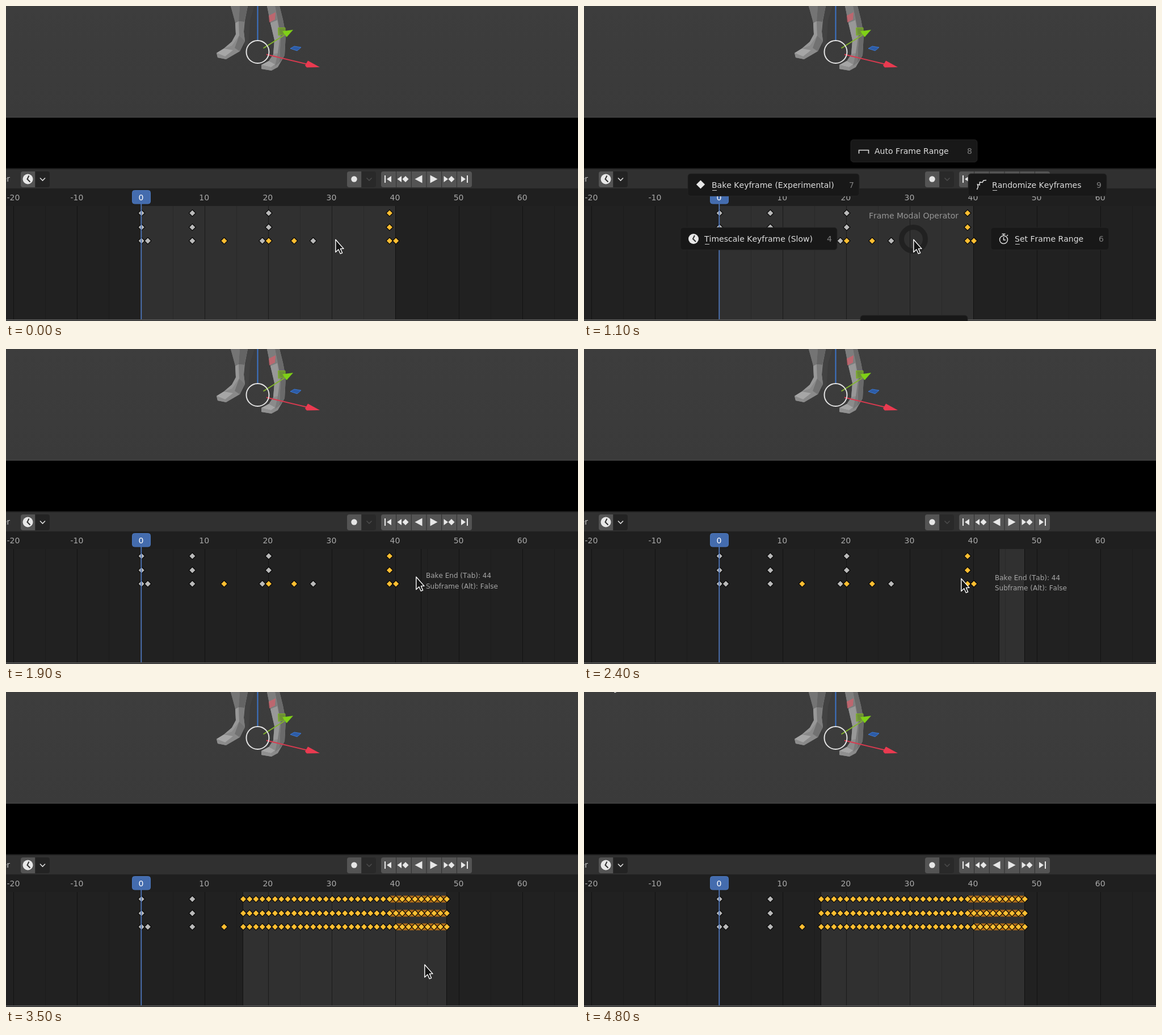
Write an HTML page that moves like this. It is 1008 px wide and 556 px high and loops after 5000 ms.

```html
<!DOCTYPE html>
<html lang="en">
<head>
<meta charset="utf-8">
<title>Keyframe baking</title>
<style>
html, body { margin: 0; width: 100%; height: 100%; overflow: hidden; background: #000; }
svg { display: block; width: 1008px; height: 556px; }
text { font: 14px "DejaVu Sans", sans-serif; font-kerning: none; white-space: pre; }
.hint text { font-size: 12px; fill: #a6a6a6; }
</style>
</head>
<body>
<svg id="stage" viewBox="0 0 1008 556" xmlns="http://www.w3.org/2000/svg">
  <defs>
    <linearGradient id="floor" x1="0" y1="0" x2="0" y2="1">
      <stop offset="0" stop-color="#3d3d3d"/><stop offset="1" stop-color="#3a3a3a"/>
    </linearGradient>
  </defs>

  <g id="viewport">
    <rect width="1008" height="197" fill="url(#floor)"/>
    <rect y="196" width="1008" height="1" fill="#4a4a4a"/>
    <g id="legs"></g>
    <path d="M443.500 0V61" stroke="#3c74c9" stroke-width="2"/>
    <path d="M463 17L475 11L474 24L464 29Z" fill="#d2606b" opacity=".75"/>
    <path d="M479.500 38.500H492V49L480 52Z" fill="#6f9d24" fill-opacity=".75" stroke="#7fb524"/>
    <path d="M453.500 74.500L491 51" stroke="#82b52c" stroke-width="2"/>
    <path d="M506 42L487 44.500L494.500 55Z" fill="#7fd016"/>
    <path d="M501 75L508 71L520 73L513 79Z" fill="#2d5ca6" stroke="#3b78d4"/>
    <path d="M459 85.500L530 102.500" stroke="#d83a4f" stroke-width="2"/>
    <path d="M553 108L532 96.500L527 105L530 108.500Z" fill="#ea3a50"/>
    <circle cx="443.500" cy="81" r="20" fill="none" stroke="#e4e4e4" stroke-width="2"/>
  </g>

  <g id="panel">
    <rect y="286" width="1008" height="2" fill="#1b1b1b"/>
    <rect y="288" width="1008" height="34" fill="#303030"/>
    <rect y="322" width="1008" height="31" fill="#1f1f1f"/>
    <rect y="353" width="1008" height="200" fill="#212121"/>
    <rect id="range" y="353" height="200" fill="#303030"/>
    <g id="grid"></g>
    <g id="edges" stroke="#111"><path d="M0 353V553"/><path d="M0 353V553"/></g>
    <g id="keys"></g>
    <g id="baked"></g>
    <g id="ruler" fill="#a8a8a8" text-anchor="middle"></g>
    <path d="M238.300 349V553" stroke="#4f78bd" stroke-width="1.800"/>
    <rect x="222.500" y="325.500" width="32" height="23.500" rx="4" fill="#446cae" stroke="#4b77bd"/>
    <text x="238" y="343" fill="#fff" text-anchor="middle">0</text>
    <rect y="553" width="1008" height="3" fill="#303030"/>
    <rect y="553" width="1008" height="2" fill="#505050"/>
  </g>

  <g id="header">
    <text x="7" y="310" fill="#c4c4c4" text-anchor="end">er</text>
    <path d="M30 292H51V320H30Q26 320 26 316V296Q26 292 30 292Z" fill="#545454"/>
    <path d="M52 292H73Q77 292 77 296V316Q77 320 73 320H52Z" fill="#232323"/>
    <path d="M60 303.500L64.500 308L69 303.500" fill="none" stroke="#ddd" stroke-width="1.600"/>
    <path d="M605 292H626V320H605Q601 320 601 316V296Q601 292 605 292Z" fill="#545454"/>
    <path d="M627 292H648Q652 292 652 296V316Q652 320 648 320H627Z" fill="#292929"/>
    <path d="M635.500 303.500L640 308L644.500 303.500" fill="none" stroke="#4c4c4c" stroke-width="1.500"/>
    <circle cx="613.500" cy="305.500" r="5.200" fill="#e6e6e6"/>
    <rect x="661" y="292" width="160" height="28" rx="4" fill="#545454"/>
    <path id="splits" stroke="#303030"/>
    <path fill="#e8e8e8" d="M667 299h2v13h-2zM679 300v11l-8-5.500z
      M697 300v11l-7.500-5.500zM704 300l5.500 5.500-5.500 5.500-5.500-5.500z
      M733.500 298.500v14l-13-7zM747.500 298.500v14l13-7z
      M771.500 300v11l7.500-5.500zM785 300l5.500 5.500-5.500 5.500-5.500-5.500z
      M802 300v11l8-5.500zM812 299h2v13h-2z"/>
  </g>

  <g id="menu">
    <circle cx="580.500" cy="411.500" r="21" fill="none" stroke="#212121" stroke-width="9"/>
    <text x="581" y="375" fill="#969696" text-anchor="middle">Frame Modal Operator</text>
  </g>

  <g id="hint" class="hint"><text></text><text y="18.500">Subframe (Alt): False</text></g>

  <path id="cursor" d="M.8 1.200V23.500L5.800 18.800L9.300 26.200L12.600 24.800L9.400 17.400H15Z"
    fill="#151515" stroke="#fff" stroke-width="1.400" stroke-linejoin="round"/>
</svg>

<script>
const LOOP = 5000, ZERO = 238, STEP = 11.21, HUB = [580.5, 411.5];
const ROWS = [365.5, 390.5, 414.5];
const GREY = "#bababa", GOLD = "#ffbe32";

const $ = id => document.getElementById(id);
const frameX = f => ZERO + f * STEP;
const keyX = f => frameX(f) + .7;
const range = (a, b, s = 1) => Array.from({ length: Math.floor((b - a) / s) + 1 }, (_, i) => a + i * s);

function add(parent, tag, attrs, text) {
  const el = document.createElementNS("http://www.w3.org/2000/svg", tag);
  for (const k in attrs) el.setAttribute(k, attrs[k]);
  if (text) el.textContent = text;
  return parent.appendChild(el);
}
const shape = (parent, d, fill, more) => add(parent, "path", { d, fill, ...more });
const show = (el, on) => el.setAttribute("display", on ? "inline" : "none");

function clock(parent, x, y) {
  add(parent, "circle", { cx: x, cy: y, r: 9, fill: "#e8e8e8" });
  shape(parent, `M${x + 2} ${y - 6}L${x - 1} ${y}L${x + 4} ${y + 5}`, "none",
    { stroke: "#333", "stroke-width": 2 });
}

function diamond(parent, f, row, fill) {
  const x = keyX(f), y = ROWS[row], r = 6;
  shape(parent, `M${x} ${y - r}l${r} ${r}l${-r} ${r}l${-r} ${-r}Z`, fill, { stroke: "#080808", "stroke-width": 1.2 });
}

// Facets of the low-poly legs
[
  ["M424 0H438L430 25L427 70L420 72L418 40Z", "#424242"],
  ["M396 0H426L421 25L419 45L421 62L412 80L388 94L373 91L371 83L384 75L398 63L405 50L404 28Z", "#8a8a8a"],
  ["M396 0H412L410 27L404 30Z", "#747474"],
  ["M412 0H426L420 28L410 27Z", "#646464"],
  ["M404 30L410 27L411 52L398 70L384 75L398 63L405 50Z", "#989898"],
  ["M410 27L420 28L419 45L421 62L411 52Z", "#7c7c7c"],
  ["M411 52L421 62L412 80L403 74Z", "#727272"],
  ["M371 83L384 75L400 78L386 89Z", "#a6a6a6"],
  ["M371 83L386 89L388 94L373 91Z", "#8d8d8d"],
  ["M460 0H482L488 24L493 50L491 87L479 108L468 114L450 111L450 104L463 97L471 85L473 60L466 30Z", "#8b8b8b"],
  ["M474 0H482L488 24L493 50L491 87L482 100L484 52Z", "#6a6a6a"],
  ["M460 0H474L478 25L466 30Z", "#7d7d7d"],
  ["M466 30L478 25L482 55L479 83L471 85L473 60Z", "#989898"],
  ["M479 83L484 52L482 100L474 106Z", "#7a7a7a"],
  ["M450 104L463 97L474 103L467 108Z", "#a5a5a5"],
  ["M450 104L467 108L468 114L450 111Z", "#909090"]
].forEach(([d, fill]) => shape($("legs"), d, fill));

// Time grid and ruler
for (const f of range(-20, 65, 5)) {
  const x = Math.floor(frameX(f)) + .5;
  shape($("grid"), `M${x} 353V553`, "none", { stroke: "#000", "stroke-opacity": f % 10 ? .14 : .42 });
}
for (const f of range(-20, 60, 10))
  if (f) add($("ruler"), "text", { x: frameX(f) - .9, y: 343 }, String(f));

$("splits").setAttribute("d", range(1, 5).map(i => `M${661 + i * 26.67} 292v28`).join(""));
clock($("header"), 38.5, 305.5);

// Keys: shared early ones, then the set before and after baking
const early = [[0, 8], [0, 8], [0, 1, 8, 13]];
const before = [[20, 39], [20, 39], [19, 20, 24, 27, 39, 40]];
const golden = [13, 24, 39, 40];
const keyColor = (f, row) => golden.includes(f) || (row === 2 && f === 20) ? GOLD : GREY;

const loose = add($("keys"), "g", {}), fixed = add($("keys"), "g", {});
ROWS.forEach((y, row) => {
  early[row].forEach(f => diamond(fixed, f, row, keyColor(f, row)));
  before[row].forEach(f => diamond(loose, f, row, keyColor(f, row)));
  const hold = keyX(row === 2 ? 40 : 39);
  add($("baked"), "rect", { x: hold, y: y - 6, width: keyX(48) - hold, height: 12, fill: "#b06c18" });
  range(16, 48).forEach(f => diamond($("baked"), f, row, GOLD));
});

// Pie menu: left, top, right, text x, label, shortcut, underlined letter width
const icons = {
  8: g => shape(g, "M484.500 260.500V254.500H501.500V260.500", "none", { stroke: "#ddd", "stroke-width": 1.6 }),
  7: g => shape(g, "M205.500 307.400l7.600 7.600-7.600 7.600-7.600-7.600z", "#e8e8e8"),
  9: g => shape(g, "M692.500 324L694.500 319L693.500 315L697 316L697.500 311L702 311.500L704 308L709 307.500", "none",
    { stroke: "#ddd", "stroke-width": 1.6 }),
  4: g => clock(g, 193, 411),
  6: g => {
    add(g, "circle", { cx: 739.5, cy: 412.5, r: 7, fill: "none", stroke: "#ddd", "stroke-width": 1.5 });
    shape(g, "M736.500 402.500H742.500M739.500 403V406M745 406L747 404M739.500 408V413H743", "none",
      { stroke: "#ddd", "stroke-width": 1.5 });
  }
};
const items = [
  [470, 236, 693, 512, "Auto Frame Range", 8, 0],
  [183, 296, 485, 225, "Bake Keyframe (Experimental)", 7, 8],
  [677, 296, 921, 719, "Randomize Keyframes", 9, 8],
  [170, 391, 446, 212, "Timescale Keyframe (Slow)", 4, 8],
  [717, 391, 925, 759, "Set Frame Range", 6, 8],
  [487, 546, 676]
].map(([left, top, right, tx, label, key, mark]) => {
  const g = add($("menu"), "g", {});
  add(g, "rect", { x: left, y: top, width: right - left, height: 39.5, rx: 5, fill: "#181818", stroke: "#262626", "stroke-width": .8 });
  if (label) {
    icons[key](g);
    add(g, "text", { x: tx, y: top + 25, fill: "#dedede" }, label);
    add(g, "text", { x: right - 18, y: top + 25, fill: "#808080" }, String(key));
    if (mark) add(g, "rect", { x: tx + 1, y: top + 29, width: mark, height: 1, fill: "#ccc" });
  }
  return { g, dx: HUB[0] - (left + right) / 2, dy: HUB[1] - top - 20 };
});

// Each step keeps whatever it does not change
const steps = [
  [0, { at: [580, 411], span: [0, 40], menu: 0, hint: null, baked: false }],
  [500, { menu: .7 }],
  [600, { menu: 1 }],
  [1200, { at: [552, 394] }],
  [1300, { at: [488, 356] }],
  [1400, { at: [438, 325] }],
  [1500, { at: [425, 317], menu: 0 }],
  [1600, { span: [16, 40] }],
  [1700, { at: [478, 346], span: [20, 40], hint: [496, 349] }],
  [1800, { at: [610, 384], span: [32, 40], hint: [628, 387] }],
  [1900, { at: [722, 401], span: [44, 44], hint: [740, 404] }],
  [2000, { at: [765, 403], span: [48, 48], hint: [783, 406] }],
  [2200, { at: [750, 403], span: [47, 48], hint: [775, 407] }],
  [2300, { at: [715, 404], span: [46, 48], hint: [755, 407] }],
  [2400, { at: [664, 404], span: [44, 48], hint: [724, 407.5] }],
  [2700, { at: [616, 404], span: [38, 48], hint: [655, 408] }],
  [2800, { at: [538, 405], span: [30, 48], hint: [566, 408.5] }],
  [2900, { at: [463, 406], span: [23, 48], hint: [481, 409.5] }],
  [3000, { at: [436, 406], span: [18, 48], hint: [454, 409.5] }],
  [3100, { at: [425, 406], span: [16, 48], hint: [443, 409.5] }],
  [3400, { at: [560, 435], hint: null, baked: true }],
  [3500, { at: [737, 480] }],
  [4200, { at: [708, 456] }],
  [4300, { at: [592, 361] }],
  [4400, { at: [405, 220] }],
  [4500, { at: [215, 88] }],
  [4600, { at: [98, 12] }],
  [4700, { at: [49, -17] }],
  [4800, { at: [45, -25.5] }]
];
let last = {};
const poses = steps.map(([t, change]) => [t, last = { ...last, ...change }]);

function draw(p) {
  const [a, b] = p.span.map(frameX);
  $("cursor").setAttribute("transform", `translate(${p.at})`);
  $("range").setAttribute("x", a);
  $("range").setAttribute("width", b - a);
  [a, b].forEach((x, i) => $("edges").children[i].setAttribute("transform", `translate(${Math.floor(x) + .5})`));
  show(loose, !p.baked);
  show($("baked"), p.baked);
  show($("menu"), p.menu > 0);
  for (const { g, dx, dy } of items)
    g.setAttribute("transform", `translate(${dx * (1 - p.menu)} ${dy * (1 - p.menu)})`);
  show($("hint"), p.hint);
  if (p.hint) {
    $("hint").setAttribute("transform", `translate(${p.hint})`);
    $("hint").firstChild.textContent = `Bake End (Tab): ${p.span[0]}`;
  }
}

function tick() {
  const t = performance.now() % LOOP;
  draw(poses.filter(([start]) => start <= t).pop()[1]);
  requestAnimationFrame(tick);
}
tick();
</script>
</body>
</html>
```
